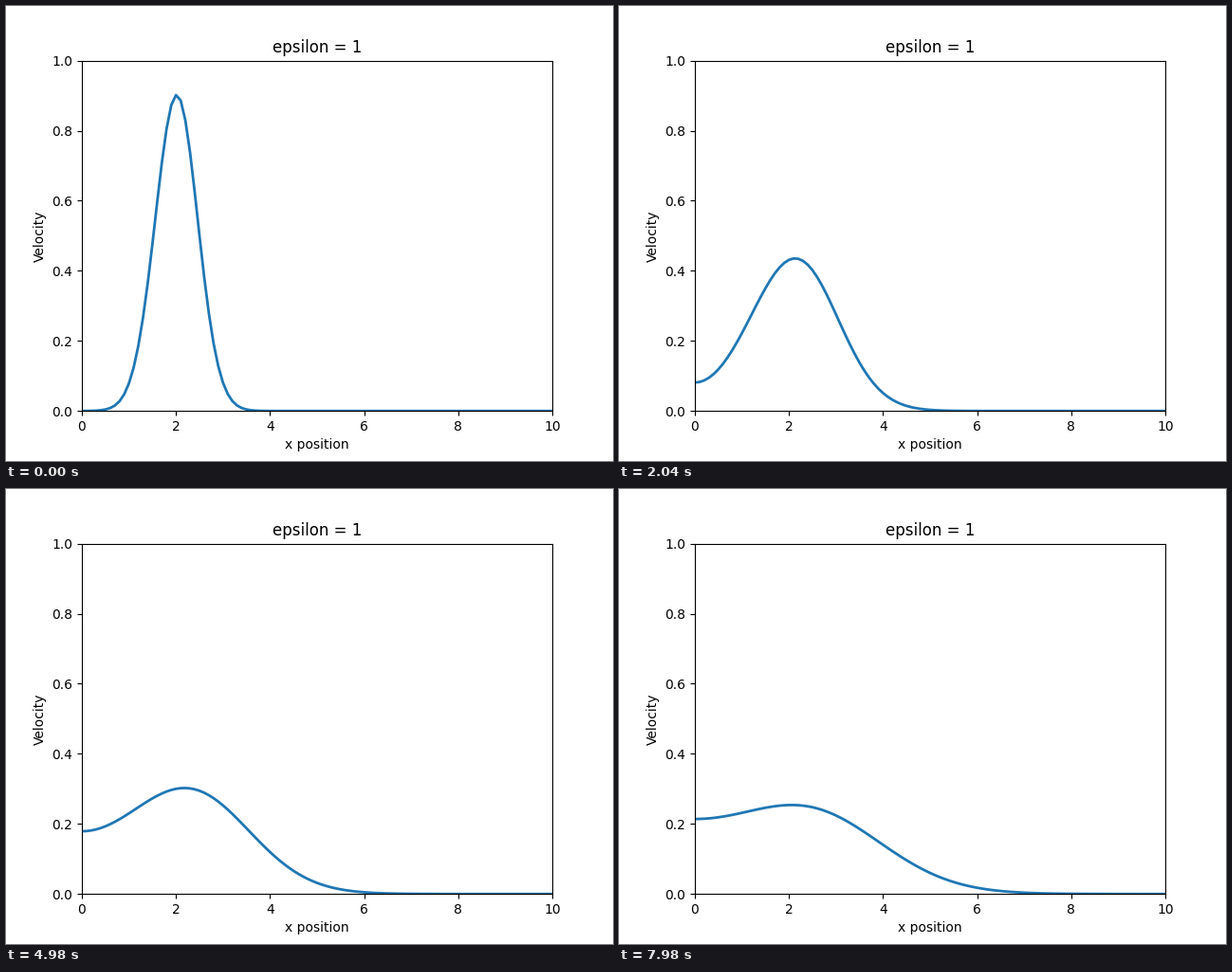
These frames come from a looping animation (640 by 480 pixels, 8 s). A matplotlib script:

```python
import numpy as np
import matplotlib.pyplot as plt
from matplotlib.animation import FuncAnimation

EPSILON = 1
N, LENGTH = 101, 10
DT = 0.005              # solver step
LEAD, PER_STEP = 4, 2   # solver steps before the first picture and per picture
TICK, HOLD, LOOP = 20, 3, 8000

x = np.linspace(0, LENGTH, N)
dx = x[1] - x[0]


def diffusion_matrix():
    """Second derivative with zero slope at both ends."""
    lap = np.diag(np.full(N, -2.0))
    lap += np.diag(np.ones(N - 1), 1) + np.diag(np.ones(N - 1), -1)
    lap[0, 1] = lap[-1, -2] = 2
    return lap / dx**2


def solve(pictures):
    """Viscous Burgers flow: explicit advection, implicit diffusion."""
    implicit = np.linalg.inv(np.eye(N) - DT * EPSILON * diffusion_matrix())
    u = np.exp(-3 * (x - 2)**2)
    slope = np.zeros(N)
    states = []
    for step in range(LEAD + PER_STEP * pictures):
        if step >= LEAD and (step - LEAD) % PER_STEP == 0:
            states.append(u)
        slope[1:-1] = (u[2:] - u[:-2]) / (2 * dx)
        u = implicit @ (u - DT * u * slope)
    return states


ticks = LOOP // TICK
states = solve(-(-ticks // HOLD))

fig, ax = plt.subplots(figsize=(6.4, 4.8), dpi=100)
line, = ax.plot(x, states[0], lw=2)
ax.set(xlim=(0, LENGTH), ylim=(0, 1), xlabel="x position", ylabel="Velocity",
       title=f"epsilon = {EPSILON}")


def update(tick):
    line.set_ydata(states[tick // HOLD])
    return line,


anim = FuncAnimation(fig, update, frames=ticks, interval=TICK, repeat=True,
                     repeat_delay=0)
plt.show()
```
